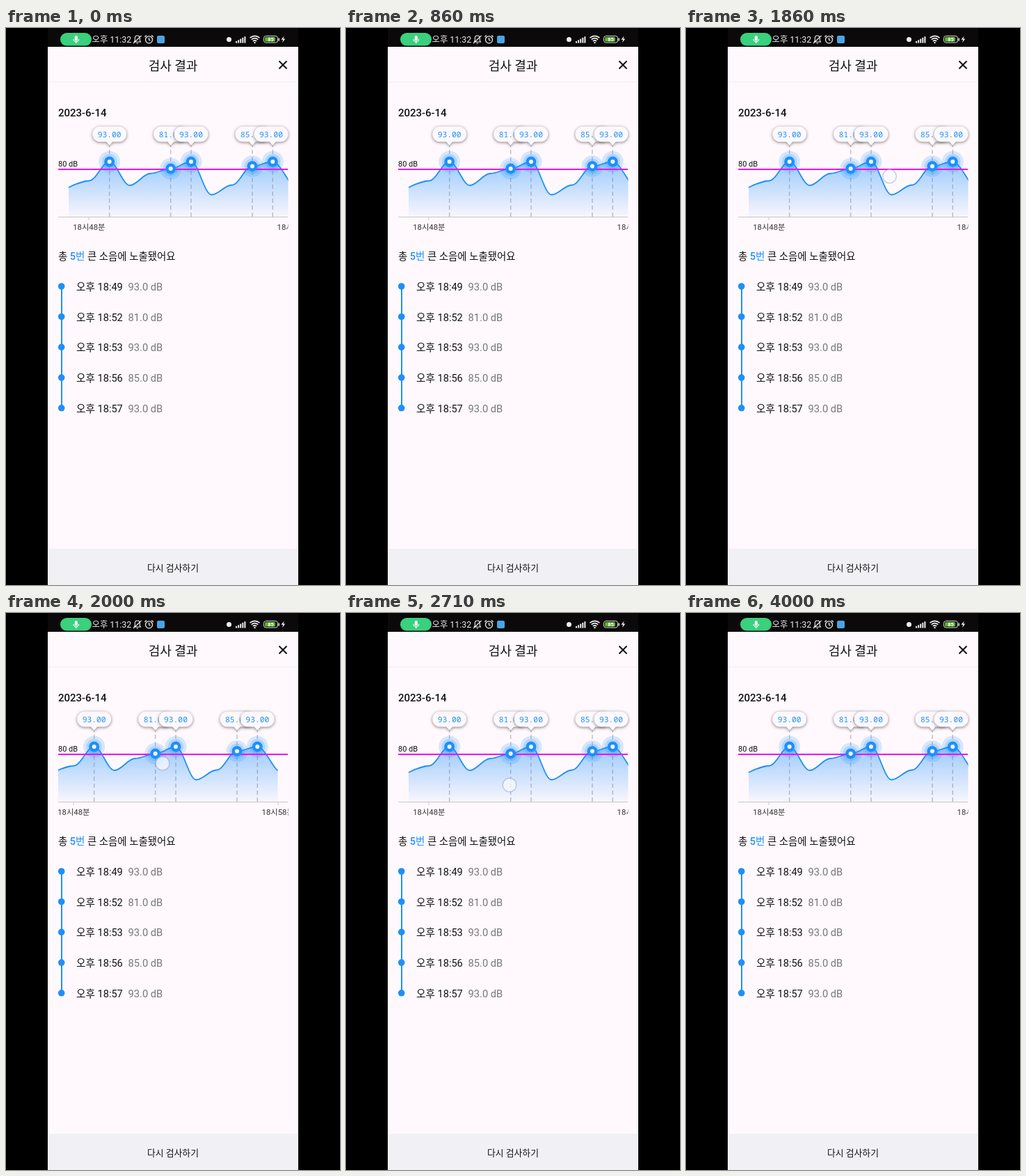
These frames come from a looping animation (480x800 px, 4.14 s). An HTML page with a canvas:

```html
<!DOCTYPE html>
<html lang="ko">
<head>
<meta charset="utf-8">
<title>검사 결과</title>
<style>
html, body { margin: 0; width: 100%; height: 100%; overflow: hidden; background: #000; }
canvas { display: block; }
</style>
</head>
<body>
<canvas width="480" height="800"></canvas>
<script>
const ctx = document.querySelector('canvas').getContext('2d');
const LOOP = 4140;
const SANS = "Roboto, 'Noto Sans CJK KR', 'Noto Sans CJK', sans-serif";
const MONO = "'Noto Sans Mono', monospace";
const BLUE = '#1e90f9', PAPER = '#fff9fd';

// Chart geometry: one reading a minute, given as heights on the stage.
const START = 90, STEP = 29.33, AXIS = 271, LEFT = 75, RIGHT = 405.5;
const SMOOTHNESS = 0.35;
const levels = [229, 219.5, 192, 226, 209, 202, 192, 239.5, 225.5, 198.5, 192, 226];
const alerts = [[2, '93.00'], [5, '81.00'], [6, '93.00'], [9, '85.00'], [10, '93.00']];
const rows = ['18:49', '18:52', '18:53', '18:56', '18:57'];
const pointX = i => START + i * STEP;

// [from, scroll, touch x, touch y, touch opacity]
const poses = [
  [0, 0],
  [1860, 0, 292.5, 213, 1],
  [2000, 22, 225, 216, 1],
  [2140, 22, 94, 212, 1],
  [2290, 22, 75, 210, 1],
  [2430, 22],
  [2710, 0, 235, 247, 1],
  [2860, 0, 300, 250, 1],
  [3000, 0],
  [3570, 0, 341, 631, 1],
  [3710, 0, 341, 631, 0.8],
  [3860, 0]
];

function text(str, x, y, size, color = '#111', align = 'left', weight = 400, family = SANS) {
  ctx.font = `${weight} ${size}px ${family}`;
  ctx.fillStyle = color;
  ctx.textAlign = align;
  ctx.fillText(str, x, y);
  return ctx.measureText(str).width;
}

function rect(x, y, w, h, color) {
  ctx.fillStyle = color;
  ctx.fillRect(x, y, w, h);
}

function pill(x, y, w, h, r, color) {
  ctx.beginPath();
  ctx.roundRect(x, y, w, h, r);
  ctx.fillStyle = color;
  ctx.fill();
}

function disc(x, y, r, color) {
  ctx.beginPath();
  ctx.arc(x, y, r, 0, 2 * Math.PI);
  ctx.fillStyle = color;
  ctx.fill();
}

function stroke(path, color, width) {
  ctx.strokeStyle = color;
  ctx.lineWidth = width;
  ctx.stroke(new Path2D(path));
}

function drawStatusBar() {
  const white = '#eee';
  rect(60, 0, 360, 27, '#0b0909');
  pill(78, 7, 45, 18.6, 9.3, '#3ad07d');
  pill(98.7, 11, 4.2, 7.5, 2.1, '#fff');
  stroke('M97 16a3.8 3.8 0 0 0 7.6 0M100.8 20v2.3', '#fff', 1.2);
  text('오후 11:32', 123.5, 21, 12.4, white);

  stroke('M184 20h9.5l-1.2-2v-3.5a3.5 3.5 0 0 0-7 0v3.5l-1.3 2M187.5 22h2.5M183 22l11.5-11', white, 1.1);
  stroke('M200.5 16.8a5 5 0 1 0 10 0a5 5 0 1 0-10 0M205.5 14v3l2 1.2M199.3 12.8l2.6-2.4M211.7 12.8l-2.6-2.4', white, 1.3);
  pill(217, 11, 11, 11, 2, '#4ba3e3');
  disc(320.5, 16.5, 3.5, white);

  for (let i = 0; i < 5; i++) rect(330 + i * 3.1, 19 - i * 1.7, 2, 2.5 + i * 1.7, white);
  stroke('M350.5 14.2q7-5.8 14 0M352.7 16.7q4.8-4 9.6 0M354.8 19q2.7-2.2 5.4 0', white, 1.6);
  disc(357.5, 21, 1.2, white);

  ctx.beginPath();
  ctx.roundRect(370.5, 11.5, 20, 9.5, 3);
  ctx.strokeStyle = '#ddd';
  ctx.lineWidth = 1;
  ctx.stroke();
  pill(372, 13, 15, 6.5, 1.5, '#58b52c');
  rect(391.5, 14.5, 1.5, 4, '#ddd');
  text('85', 380.5, 19.3, 7.5, '#fff', 'center', 700);
  ctx.fillStyle = white;
  ctx.fill(new Path2D('M399.5 11.5l-4 5.3h2.6l-1 4.2l4.2-5.4h-2.7z'));
}

function drawPage() {
  rect(0, 0, 480, 800, '#000');
  rect(60, 27, 360, 773, PAPER);
  drawStatusBar();
  text('검사 결과', 240, 60.5, 18, '#111', 'center');
  stroke('M392.5 47.5l11 11M403.5 47.5l-11 11', '#111', 2);
  rect(60, 77, 360, 1, '#efebef');
  text('2023-6-14', 75, 127, 15, '#111', 'left', 500);

  let x = 75;
  x += text('총 ', x, 333, 14.45);
  x += text('5번', x, 333, 14.45, BLUE, 'left', 500);
  text(' 큰 소음에 노출됐어요', x, 333, 14.45);

  rect(79, 371, 2, 174.5, BLUE);
  rows.forEach((time, i) => {
    const y = 371 + i * 43.7;
    disc(79.7, y, 4.8, BLUE);
    text('오후 ' + time, 101, y + 6, 14.6);
    text((+alerts[i][1]).toFixed(1) + ' dB', 175.5, y + 6, 14.7, '#777');
  });

  rect(60, 748, 360, 52, '#f1f0f5');
  text('다시 검사하기', 240, 779.5, 12.8, '#111', 'center');
}

// Every reading is passed level; the handles shrink to nothing at the start.
function curve() {
  const path = new Path2D();
  const last = levels.length - 1;
  const reach = STEP * SMOOTHNESS;
  path.moveTo(pointX(0), levels[0]);
  for (let i = 1; i <= last; i++) {
    const out = i === 1 ? 0 : reach;
    const into = i === last ? reach / 2 : reach;
    path.bezierCurveTo(
      pointX(i - 1) + out, levels[i - 1],
      pointX(i) - into, levels[i],
      pointX(i), levels[i]);
  }
  return path;
}

// The body of a bubble stays inside the chart while its tip marks the reading.
function drawBubble(tip, label) {
  const x = Math.min(tip, RIGHT - 24.5);
  ctx.save();
  ctx.shadowColor = 'rgba(0,0,0,.5)';
  ctx.shadowBlur = 4;
  ctx.shadowOffsetY = 1;
  ctx.beginPath();
  ctx.roundRect(x - 24.5, 141.5, 49, 22, 11);
  ctx.moveTo(tip + 5, 163);
  ctx.lineTo(tip, 168.5);
  ctx.lineTo(tip - 5, 163);
  ctx.fillStyle = '#fdf8fc';
  ctx.fill();
  ctx.restore();
  text(label, x, 157, 11.3, BLUE, 'center', 400, MONO);
}

function drawChart(scroll) {
  const line = curve();
  const area = new Path2D(line);
  area.lineTo(pointX(levels.length - 1), AXIS);
  area.lineTo(START, AXIS);
  const shade = ctx.createLinearGradient(0, 190, 0, AXIS);
  shade.addColorStop(0, 'rgba(30,144,255,.46)');
  shade.addColorStop(1, 'rgba(30,144,255,.03)');

  ctx.save();
  ctx.beginPath();
  ctx.rect(LEFT, 135, RIGHT - LEFT, 165);
  ctx.clip();
  rect(LEFT, AXIS, 330, 1, '#c9c6c9');

  ctx.save();
  ctx.translate(-scroll, 0);
  ctx.fillStyle = shade;
  ctx.fill(area);
  ctx.strokeStyle = BLUE;
  ctx.lineWidth = 1.8;
  ctx.stroke(line);
  for (const [i] of alerts) {
    ctx.setLineDash([6, 4]);
    stroke(`M${pointX(i)} ${AXIS}V168`, 'rgba(130,130,145,.5)', 1.5);
    ctx.setLineDash([]);
    disc(pointX(i), levels[i], 15.5, 'rgba(30,144,255,.18)');
    disc(pointX(i), levels[i], 11, 'rgba(30,144,255,.2)');
  }
  for (const [i, label] of [[1, '18시48분'], [11, '18시58분']]) {
    rect(Math.round(pointX(i)) - 0.5, AXIS, 1, 5, '#c9c6c9');
    text(label, pointX(i), 290, 11.3, '#333', 'center');
  }
  ctx.restore();

  rect(LEFT, 202, 330, 2, '#f508f5');
  text('80 dB', LEFT, 199, 11);
  ctx.restore();

  for (const [i, label] of alerts) {
    const x = pointX(i) - scroll;
    disc(x, levels[i], 7.5, BLUE);
    disc(x, levels[i], 3, '#fff');
    drawBubble(x, label);
  }
}

function drawTouch(x, y, opacity) {
  ctx.save();
  ctx.globalAlpha = opacity;
  disc(x, y, 9.8, 'rgba(248,248,252,.75)');
  ctx.strokeStyle = 'rgba(150,170,200,.65)';
  ctx.lineWidth = 1.3;
  ctx.stroke();
  ctx.restore();
}

const begin = performance.now();

function frame() {
  const time = (performance.now() - begin) % LOOP;
  const [, scroll, x, y, opacity] = poses.findLast(pose => pose[0] <= time);
  drawPage();
  drawChart(scroll);
  if (opacity) drawTouch(x, y, opacity);
  requestAnimationFrame(frame);
}

frame();
</script>
</body>
</html>
```
